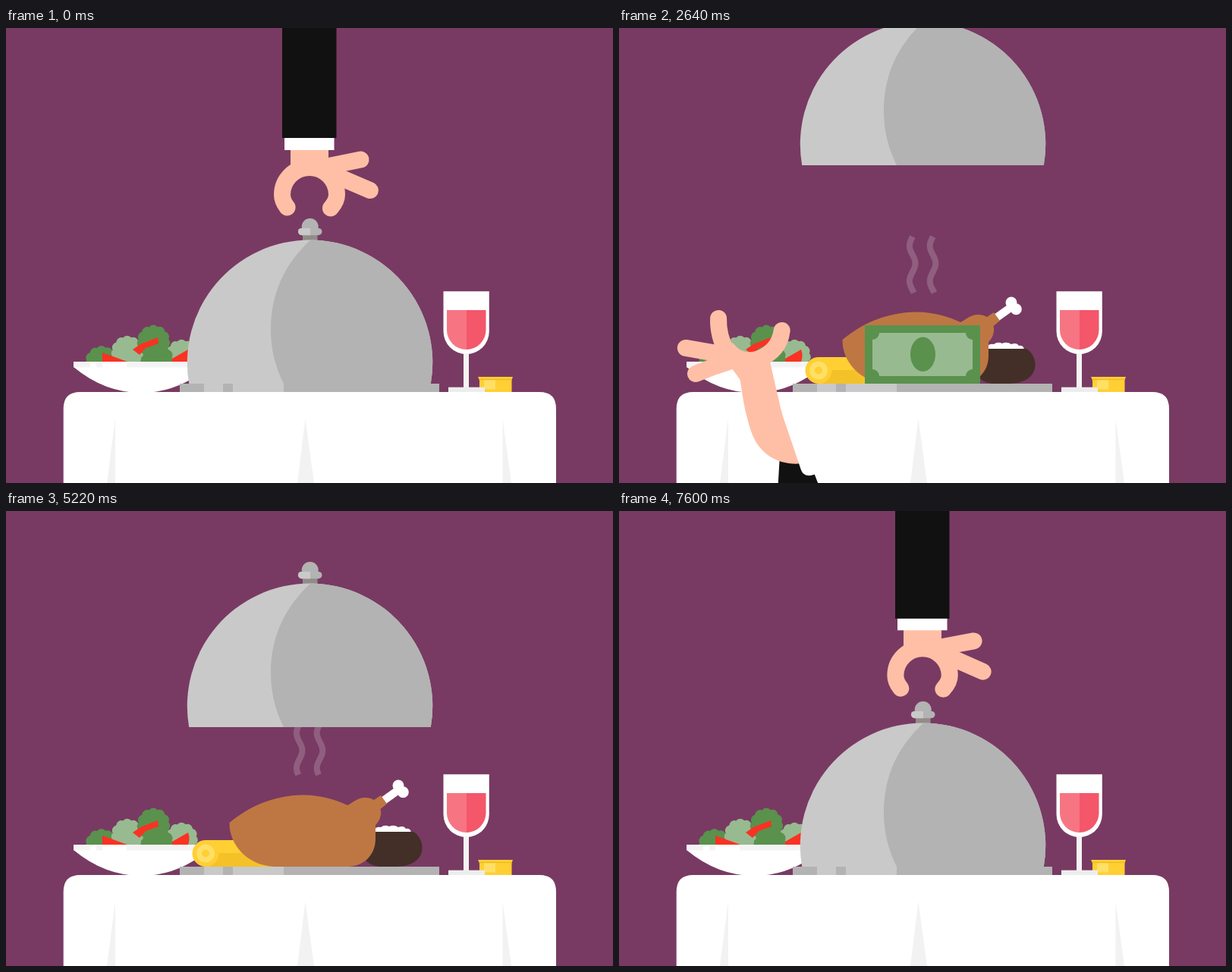
An HTML page for the animation above (7.63 s loop, 800 by 600 pixels).

```html
<!DOCTYPE html>
<html lang="en">
<head>
<meta charset="utf-8">
<title>Dinner</title>
<style>
html, body { margin: 0; width: 100%; height: 100%; overflow: hidden; background: #783a62; }
svg { display: block; width: 100%; height: 100%; }
.skin { fill: #ffbfa6; }
.limb { fill: none; stroke: #ffbfa6; stroke-width: 22; stroke-linecap: round; stroke-linejoin: round; }
.white { fill: #fff; }
.pale { fill: #f2f2f2; }
.black { fill: #121111; }
.silver { fill: #c9c9c9; }
.steel { fill: #b3b3b3; }
.leaf { fill: #5a914d; }
.mint { fill: #98ba90; }
.red { fill: #fa3223; }
.gold { fill: #ffcf33; }
.cream { fill: #ffdf66; }
</style>
</head>
<body>
<svg viewBox="0 0 800 600">
  <defs>
    <clipPath id="bowlCut"><rect x="80" y="380" width="200" height="61"/></clipPath>
    <clipPath id="wineCut"><path d="M581 360H632.500V398.200A25.750 25.750 0 0 1 581 398.200Z"/></clipPath>
    <clipPath id="domeCut"><path d="M241.200 469A161.700 161.700 0 1 1 559.800 469Z"/></clipPath>
    <clipPath id="billCut"><rect x="334" y="402" width="132" height="57"/></clipPath>
  </defs>
  <rect width="800" height="600" fill="#783a62"/>

  <g clip-path="url(#bowlCut)">
    <g id="salad"></g>
    <path class="red" d="M127 428L160 440V443H127Z"/>
    <path class="red" d="M167 424L177 417L200 408L201 416L184 422L176 431Z"/>
    <path class="red" d="M219 440V436L240 424Q243 431 240 441H219Z"/>
  </g>
  <path class="white" d="M89 440H267V447Q226 481 178 481Q130 481 89 447Z"/>
  <path class="pale" opacity=".8" d="M89 440H111V447.500H89ZM119 440H127V447.500H119ZM159 440H267V447.500H159Z"/>

  <g id="steam" fill="none" stroke="#fff" stroke-opacity=".18" stroke-width="8">
    <path id="steamA"/><path id="steamB"/>
  </g>

  <g id="food">
    <rect class="gold" x="263" y="434" width="90" height="35"/>
    <path fill="#f4c228" d="M279 451H353V469H268Z"/>
    <circle class="gold" cx="263" cy="451.500" r="17.500"/>
    <circle class="cream" cx="263" cy="451.500" r="12"/>
    <circle class="gold" cx="263" cy="451.500" r="5"/>
    <path class="white" d="M484 424Q486 415 494 417Q499 413 505 416Q511 413 517 417Q524 414 527 419Q533 418 534 424Z"/>
    <path fill="#432f28" d="M478 423H537C554 433 557 469 513 469H495C480 469 470 460 470 450Z"/>
    <path d="M496 383L517 368" stroke="#fff" stroke-width="10.500"/>
    <circle class="white" cx="517" cy="362" r="7.500"/>
    <circle class="white" cx="523.300" cy="370.700" r="7.500"/>
    <path fill="#be7743" d="M294.500 411C320 390 352 375 392 374.500C415 374.500 436 381 450 388C457 385 463 377.500 474 378Q480 378 485 381L494 375L502 386L493.500 393C496 401 491 411 487 414V432C487 455 470 469 450 469H353C318 467 294 440 294.500 411Z"/>
  </g>

  <rect class="steel" x="229" y="469" width="342" height="11"/>
  <path class="silver" d="M261 469H286V480H261ZM299 469H366V480H299Z"/>

  <path class="white" d="M576.500 347.300H636.800V400A30.150 30.150 0 0 1 576.500 400Z"/>
  <g clip-path="url(#wineCut)">
    <path id="wineL" fill="#f77583"/><path id="wineR" fill="#f4566a"/>
  </g>
  <rect x="603" y="429" width="7" height="46" fill="#f4f4f4"/>
  <path class="gold" d="M622 460H668L666.500 464V480H624V464Z"/>
  <rect class="cream" x="630" y="464" width="15" height="12.500"/>
  <rect x="623.500" y="462.800" width="43.500" height="1.400" fill="#ecb921"/>
  <rect x="583" y="473.700" width="48" height="6.500" fill="#ededed"/>

  <path class="white" d="M75.700 600V502Q75.700 480 98 480H703Q725 480 725 502V600Z"/>
  <path class="pale" d="M144 515V600H133ZM394.500 515L406 600H384ZM654.500 515L666 600H654.500Z"/>

  <g id="cash">
    <rect class="leaf" x="324" y="392" width="152" height="77"/>
    <rect class="mint" x="334" y="402" width="132" height="57"/>
    <g class="leaf" clip-path="url(#billCut)">
      <circle cx="334" cy="402" r="9"/><circle cx="466" cy="402" r="9"/>
      <circle cx="334" cy="459" r="9"/><circle cx="466" cy="459" r="9"/>
    </g>
    <ellipse class="leaf" cx="400.500" cy="430.300" rx="16.500" ry="22.700"/>
  </g>

  <g id="dome">
    <rect x="391" y="271" width="19.500" height="10" fill="#938b88"/>
    <circle class="steel" cx="400.700" cy="262" r="11"/>
    <rect class="steel" x="385" y="264" width="31.500" height="9.200" rx="4.600"/>
    <path class="silver" d="M401 264H389.600A4.600 4.600 0 0 0 389.600 273.200H401Z"/>
    <g clip-path="url(#domeCut)">
      <rect class="silver" x="230" y="270" width="340" height="200"/>
      <path class="steel" d="M402 279C367 311 349 350 349 398C349 424 355 447 366 469H570V270H402Z"/>
    </g>
  </g>

  <g id="thief">
    <path class="black" d="M190 568L213 578V588Q213 600 228 600L240 900H90L177 600Z"/>
    <path class="skin" d="M150 401L168 395Q181 396 184 407Q190 420 207 421L222 432L220 440L215 490Q213 505 213 520V580C185 572 167 550 167 520C167 490 172 470 175 450L170 434L150 434Z"/>
    <path class="limb" d="M120.500 387.500L160 409M122 424L165 422M174 364.500Q166 385 170 412M248 406.500Q236 431 207 432"/>
  </g>

  <g id="waiter">
    <rect class="skin" id="wrist" x="375" width="50"/>
    <path class="limb" id="grip"/>
    <path class="limb" id="fingers"/>
    <rect class="white" id="cuff" x="367" width="65.500"/>
    <rect class="black" x="364" y="-600" width="71.500" height="600"/>
  </g>
</svg>
<script>
const LOOP = 7630;
const $ = id => document.getElementById(id);
const set = (id, attrs) => { for (const k in attrs) $(id).setAttribute(k, attrs[k]); };
const clamp = x => Math.max(0, Math.min(1, x));
const smooth = x => { x = clamp(x); return x * x * (3 - 2 * x); };
const mix = (a, b, u) => a + (b - a) * u;

// Each key is [time, ...values]
function pose(keys, t) {
  if (t <= keys[0][0]) return keys[0].slice(1);
  for (let i = 1; i < keys.length; i++) {
    const a = keys[i - 1], b = keys[i];
    if (t <= b[0]) {
      const u = smooth((t - a[0]) / (b[0] - a[0]));
      return a.slice(1).map((v, j) => mix(v, b[j + 1], u));
    }
  }
  return keys[keys.length - 1].slice(1);
}

function leafPath(cx, cy, r, bumps) {
  let d = "";
  for (let i = 0; i <= bumps; i++) {
    const a = i / bumps * Math.PI * 2 - 1.3;
    const x = (cx + r * Math.cos(a)).toFixed(1), y = (cy + r * Math.sin(a)).toFixed(1);
    d += i ? `A${r * 0.36} ${r * 0.36} 0 0 1 ${x} ${y}` : `M${x} ${y}`;
  }
  return d + "Z";
}
$("salad").innerHTML = [
  ["leaf", 126, 441, 20], ["mint", 231.5, 432, 19.5], ["leaf", 198, 438, 21],
  ["mint", 160, 427, 19.5], ["leaf", 194.5, 413.5, 20]
].map(([c, x, y, r]) => `<path class="${c}" d="${leafPath(x, y, r, 11)}"/>`).join("");

const TOP = 288, DROP = 4949, LAND = 5400;
function lift(t) {
  if (t < DROP) return TOP * smooth((t - 884) / 980);
  if (t < LAND) return TOP * (1 - ((t - DROP) / (LAND - DROP)) ** 2);
  let start = LAND, span = 244, height = 21;
  for (let i = 0; i < 3; i++) {
    const u = (t - start) / span;
    if (u < 1) return height * 4 * u * (1 - u);
    start += span; span /= 2; height /= 4;
  }
  return 0;
}

const GRIP = [[-200, .25], [300, -.45], [400, -.45], [800, 1]];
function drawWaiter(t, up) {
  const near = t > 7000 ? t - LOOP : t;
  const shown = near > -490 && near < 2400;
  set("waiter", { display: shown ? "inline" : "none" });
  if (!shown) return;
  const rest = 16.5 * Math.exp(-near / 173);
  const g = pose(GRIP, near)[0];
  const cuff = Math.max(12, 19 - rest / 5.5);
  set("waiter", { transform: `translate(0 ${161.5 - rest - up})` });
  set("cuff", { y: -1, height: cuff + 1 });
  set("wrist", { y: cuff - 1, height: 42 - cuff });
  const at = (x0, y0, x1, y1) => [mix(x0, x1, g), mix(y0, y1, g)];
  const [cx, r] = at(400, 36, 401, 31), cy = 75;
  const [lx, ly] = at(370.5, 91.5, 384, 98.5);
  const [rx, ry] = at(428, 92.5, 417.5, 97.5);
  const bend = mix(8, 13, g);
  set("grip", { d: `M${lx} ${ly}Q${cx - r} ${cy + bend} ${cx - r} ${cy}A${r} ${r} 0 0 1 ${cx + r} ${cy}Q${cx + r} ${cy + bend} ${rx} ${ry}` });
  set("fingers", { d: `M${at(428, 36.5, 428, 43.5)}L${at(467.5, 28.5, 468.5, 45)}M${at(438, 51, 438, 60)}L${at(480, 69, 474, 83.5)}` });
}

const REACH = [
  [2220, -40, 290, -10], [2560, -55, 10, -25], [2940, 225, -5, 30], [3330, 0, 0, 0],
  [3510, -68, 15, -20], [3720, 110, 0, 35], [3900, 48, 90, 14], [4230, 40, 340, 8]
];
function drawThief(t) {
  const shown = t > 2220 && t < 4230;
  set("thief", { display: shown ? "inline" : "none" });
  const [x, y, a] = pose(REACH, t);
  set("thief", { transform: `translate(${x} ${y}) rotate(${a} 195 430)` });
  const held = t > 3720;
  set("cash", {
    display: t > 800 && t < 4230 ? "inline" : "none",
    transform: held ? `translate(${x - 110} ${y}) rotate(${(a - 35) * .4} 330 430)` : ""
  });
}

function wave(x, top, t) {
  let d = "";
  for (let y = top; y < 349.5; y += 2) {
    const yy = Math.min(y, 349.5);
    const crest = 288.8 - .0876 * (t - 1830);
    const sx = x + 3.8 * Math.cos((yy - crest) / 46.3 * Math.PI * 2);
    d += `${d ? "L" : "M"}${sx.toFixed(2)} ${yy.toFixed(2)}`;
  }
  return d;
}
function drawSteam(t) {
  const shown = t > 1300 && t < LAND;
  set("steam", { display: shown ? "inline" : "none" });
  if (!shown) return;
  const top = 274.5 - .0026 * (t - 2700) + 80 * Math.exp(-(t - 1300) / 260);
  set("steamA", { d: wave(386.7, top, t) });
  set("steamB", { d: wave(413.5, top, t) });
}

function drawWine(t) {
  const s = t - LAND;
  const d = s > 0 && s < 510 ? 4 * Math.sin(s / 38) * (1 - s / 510) ** 1.5 : 0;
  set("wineL", { d: `M580 ${372 + d}L607 372V430H580Z` });
  set("wineR", { d: `M607 372L634 ${372 - d}V430H607Z` });
}

function draw(t) {
  const up = lift(t);
  set("dome", { transform: `translate(0 ${-up})` });
  set("food", { display: up > 0 ? "inline" : "none" });
  drawWaiter(t, up);
  drawThief(t);
  drawSteam(t);
  drawWine(t);
}

let begin = null;
function tick(now) {
  if (begin === null) begin = now;
  draw((now - begin) % LOOP);
  requestAnimationFrame(tick);
}
draw(0);
requestAnimationFrame(tick);
</script>
</body>
</html>
```
